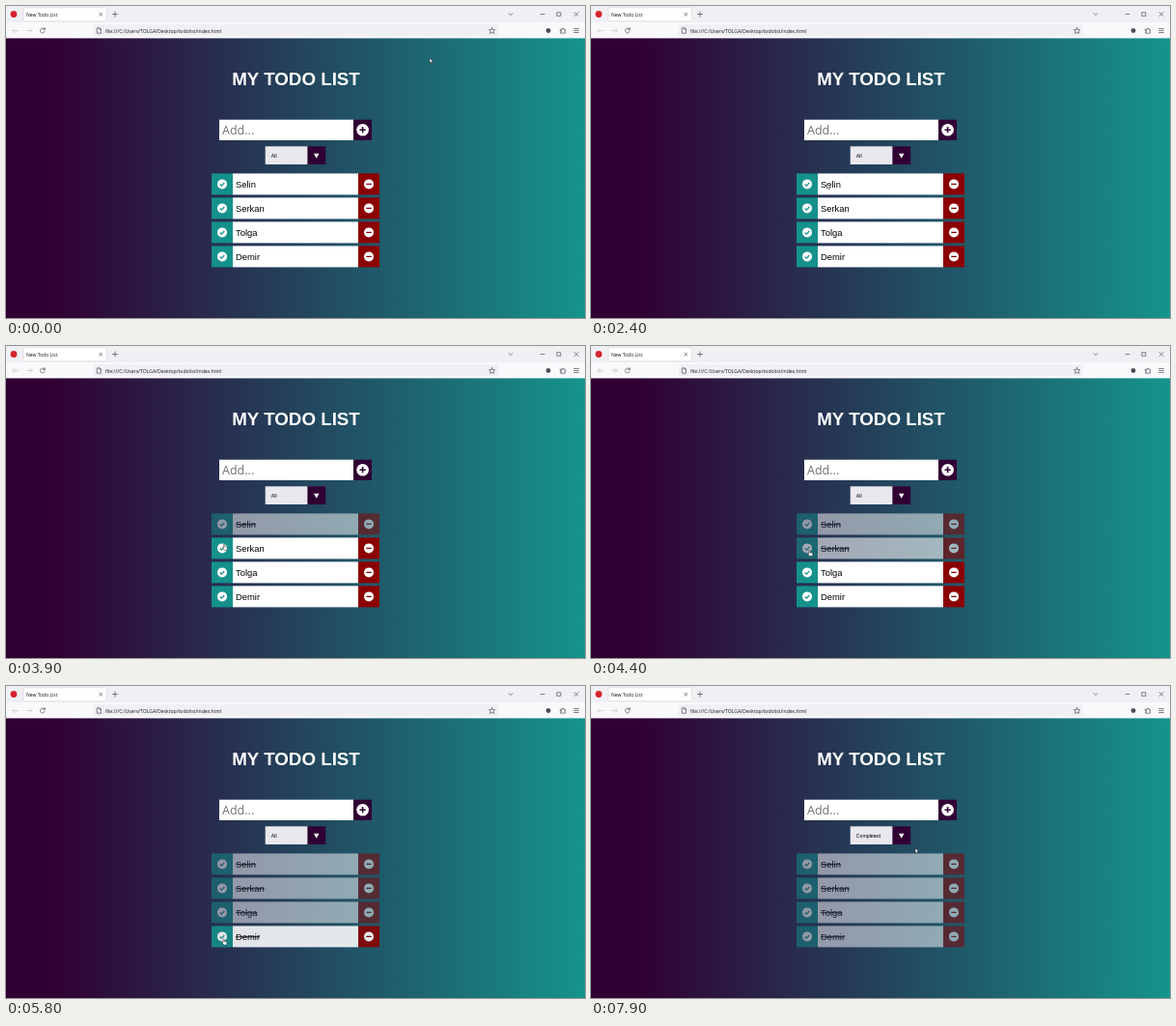
An HTML page for the animation above (8 s loop, 600 by 323 pixels).

```html
<!DOCTYPE html>
<html lang="en">
<head>
<meta charset="utf-8">
<title>New Todo List</title>
<style>
  html, body { margin: 0; width: 100%; height: 100%; overflow: hidden; background: #300032; }
  svg { display: block; width: 600px; height: 323px; }
  text { white-space: pre; }
  .ui { font-family: "Open Sans", "Noto Sans", sans-serif; }
  .page { font-family: "Liberation Sans", Arial, sans-serif; }
  .icon { fill: none; stroke: #4c4c55; stroke-width: .7; stroke-linecap: round; stroke-linejoin: round; }
  .off { stroke: #c3c3c9; }
  .done text { text-decoration: line-through; }
</style>
</head>
<body>
<svg viewBox="0 0 600 323">
  <defs>
    <linearGradient id="bg">
      <stop offset=".08" stop-color="#300032"/>
      <stop offset="1" stop-color="#15938d"/>
    </linearGradient>
  </defs>
  <rect width="600" height="323" fill="url(#bg)"/>

  <!-- browser window -->
  <g class="ui">
    <rect width="600" height="17" fill="#f0f0f4"/>
    <rect y="17" width="600" height="16.4" fill="#f9f9fb"/>
    <rect x="18" y="1.7" width="86.5" height="14" rx="1.5" fill="#fff" stroke="#d2d2da" stroke-width=".6"/>
    <circle cx="8" cy="8.5" r="3.4" fill="#d5232f"/>
    <text x="21" y="10.5" font-size="5" fill="#15141a">New Todo List</text>
    <path class="icon" d="M96.8 7.2l2.8 2.8m0-2.8l-2.8 2.8M110.5 8.5h5m-2.5-2.5v5"/>
    <path class="icon" d="M521 7.5l2 2 2-2M554 8.5h4M571.2 6.7h3.6v3.6h-3.6zM589 6.5l4 4m0-4l-4 4"/>
    <path class="icon off" d="M12.5 25.5h-5.5m2.3-2.3l-2.3 2.3 2.3 2.3M21.5 25.5h5.5m-2.3-2.3l2.3 2.3-2.3 2.3"/>
    <path class="icon" d="M40 24a2.5 2.5 0 1 0 .2 2.4M40.4 22.6v1.8h-1.8"/>
    <rect x="91" y="19.2" width="419" height="12.4" rx="1.5" fill="#f0f0f4"/>
    <path class="icon" d="M94.7 22.8h2.3l1.4 1.4v4h-3.7zM97 22.8v1.4h1.4"/>
    <text x="103" y="27.6" font-size="5.1" fill="#15141a">file:///C:/Users/TOLGA/Desktop/todolist/index.html</text>
    <path class="icon" d="M503.7 22.5l.9 2 2.2.2-1.6 1.5.5 2.2-2-1.1-2 1.1.5-2.2-1.6-1.5 2.2-.2z"/>
    <circle cx="562" cy="25.5" r="2.4" fill="#4c4c55"/>
    <path class="icon" d="M574.6 24.2h1.7v-1h1.4v1h1.7v4h-4.8v-1.3h1v-1.4h-1z"/>
    <path class="icon" d="M588.6 23.5h4.8m-4.8 2h4.8m-4.8 2h4.8"/>
  </g>

  <!-- page -->
  <text class="page" x="300.5" y="82" font-size="18.75" font-weight="700" fill="#fff" text-anchor="middle">MY TODO LIST</text>
  <rect x="221" y="117.7" width="139.5" height="21.3" fill="#fff"/>
  <text class="ui" x="224" y="133" font-size="12.5" fill="#707075">Add...</text>
  <rect x="360" y="117.7" width="19" height="21.3" fill="#300032"/>
  <circle cx="369.6" cy="128.2" r="6.3" fill="#fff"/>
  <path d="M366.5 128.2h6.2m-3.1-3.1v6.2" stroke="#300032" stroke-width="1.6"/>
  <rect x="268.7" y="145.3" width="44" height="18.7" fill="#e9e8ed"/>
  <text id="filter" class="page" x="274.8" y="156.7" font-size="5.2" fill="#000">All</text>
  <rect x="312.5" y="145.3" width="18.7" height="18.7" fill="#300032"/>
  <path d="M319 152.7h5.4l-2.7 5z" fill="#fff"/>
  <g id="list" class="page" font-size="9.4"></g>

  <path id="arrow" d="M0 0v4.9l1.2-1.1.8 1.9.9-.4-.8-1.8h1.6z" fill="#fff" stroke="#111" stroke-width=".45"/>
  <path id="hand" d="M-.5 0q.6-.5 1.1 0v2.2l2.3.6q.6.2.5.9l-.4 2.4h-2.9l-1.9-2.5q.3-.7 1.3 0z" fill="#fff" stroke="#111" stroke-width=".45"/>
</svg>
<script>
const LOOP = 8000, FADE = 500, FILTER_AT = 7300;
const $ = id => document.getElementById(id);

const items = [
  { name: "Selin", at: 3280 },
  { name: "Serkan", at: 4130 },
  { name: "Tolga", at: 4890 },
  { name: "Demir", at: 5710 }
];

// time, x, y of the pointer tip
const path = [
  [0, 439, 54], [250, 439, 54], [1200, 301.5, 187], [1600, 301.5, 187],
  [2700, 232, 183.5], [3350, 232, 183.5], [3800, 226, 205.5], [4250, 226, 205.5],
  [4750, 228, 233], [5050, 228, 233], [5600, 225.5, 262], [5950, 225.5, 262],
  [6650, 291, 155], [6900, 291, 155], [7200, 290, 170], [7400, 290, 170], [7850, 336, 168]
];

$("list").innerHTML = items.map(({ name }, i) => `
  <g transform="translate(213 ${173.4 + 25 * i})">
    <rect width="22" height="22" fill="#15918c"/>
    <rect x="22" width="130" height="22" fill="#fff"/>
    <rect x="152" width="22" height="22" fill="#8b0000"/>
    <circle cx="11" cy="11" r="5" fill="#fff"/>
    <path d="M8.7 11.1l1.6 1.6 3-3.1" fill="none" stroke="#15918c" stroke-width="1.2"/>
    <circle cx="163" cy="11" r="5" fill="#fff"/>
    <path d="M160.3 11h5.4" stroke="#8b0000" stroke-width="1.3"/>
    <text x="25" y="14.4">${name}</text>
  </g>`).join("");
const rows = [...$("list").children];

const clamp = v => Math.min(1, Math.max(0, v));
const smooth = p => p * p * (3 - 2 * p);

// CSS "ease": cubic-bezier(.25, .1, .25, 1)
function ease(p) {
  if (p <= 0 || p >= 1) return clamp(p);
  const curve = (a, b, s) => 3 * a * s * (1 - s) ** 2 + 3 * b * s * s * (1 - s) + s ** 3;
  let lo = 0, hi = 1;
  for (let i = 0; i < 20; i++) {
    const mid = (lo + hi) / 2;
    if (curve(.25, .25, mid) < p) lo = mid; else hi = mid;
  }
  return curve(.1, 1, lo);
}

function pointer(t) {
  const i = path.findIndex(k => k[0] > t);
  if (i < 0) return path[path.length - 1].slice(1);
  const [t0, x0, y0] = path[i - 1], [t1, x1, y1] = path[i];
  const p = smooth((t - t0) / (t1 - t0));
  return [x0 + (x1 - x0) * p, y0 + (y1 - y0) * p];
}

function draw(t) {
  items.forEach(({ at }, i) => {
    rows[i].setAttribute("class", t >= at ? "done" : "");
    rows[i].setAttribute("opacity", 1 - .5 * ease((t - at) / FADE));
  });
  $("filter").textContent = t < FILTER_AT ? "All" : "Completed";

  const [x, y] = pointer(t);
  const onCheck = x > 213 && x < 235 && y > 173 && y < 271;
  for (const id of ["arrow", "hand"]) {
    $(id).setAttribute("transform", `translate(${x} ${y})`);
    $(id).setAttribute("visibility", (id === "hand") === onCheck ? "visible" : "hidden");
  }
}

const start = performance.now();
function frame() {
  draw((performance.now() - start) % LOOP);
  requestAnimationFrame(frame);
}
frame();
</script>
</body>
</html>
```
